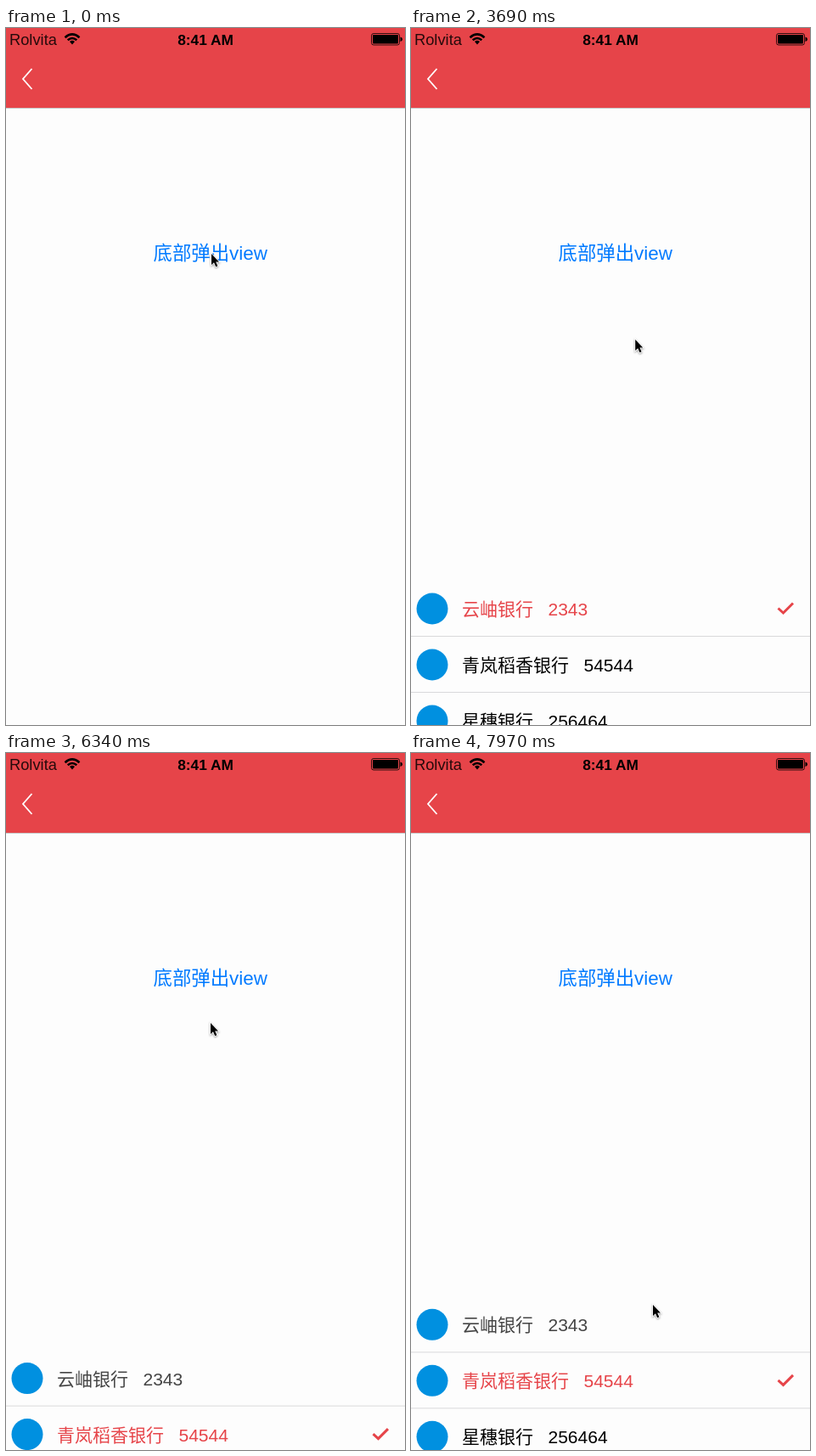
Animation, 470 px wide and 821 px high, one loop 8000 ms. Source, as an HTML page:

```html
<!DOCTYPE html>
<html lang="zh-CN">
<head>
<meta charset="utf-8">
<style>
html, body { margin: 0; height: 100%; overflow: hidden; background: #fdfdfd; }
svg { display: block; width: 100vw; height: 100vh; }
text { font-family: "Liberation Sans", "Noto Sans CJK SC", "Noto Sans CJK", sans-serif; white-space: pre; }
#button, .row text { font-weight: 300; }
.row text { font-size: 21px; }
#cursor { filter: drop-shadow(0 1px 1px #0006); }
</style>
</head>
<body>
<svg viewBox="0 0 470 821">
  <rect width="470" height="821" fill="#fdfdfd"/>
  <rect width="470" height="94" fill="#e64449"/>
  <rect y="94" width="470" height="0.7" fill="#b2b2b2"/>

  <text x="4" y="20" font-size="18.3" fill="#260a0b">Rolvita</text>
  <path d="M69.5 11.2Q78 3.6 86.5 11.2M72.7 14.3Q78 9.7 83.3 14.3" fill="none" stroke="#000" stroke-width="2.6"/>
  <path d="M75 16Q78 13.7 81 16L78 19.5Z"/>
  <text x="235" y="20" font-size="17.3" font-weight="700" text-anchor="middle">8:41 AM</text>
  <rect x="430.5" y="6.5" width="33" height="13.5" rx="2.5" fill="none" stroke="#000" stroke-width="0.8"/>
  <rect x="432" y="8" width="30" height="10.5" rx="1"/>
  <path d="M464.5 10.5Q467 11 467 13.2T464.5 16Z"/>
  <path d="M30.5 48L20 60L30.5 72" fill="none" stroke="#fff" stroke-width="1.8"/>

  <text id="button" x="173.5" y="273" font-size="22.4" fill="#007aff">底部弹出view</text>
  <g id="panel"></g>
  <path id="cursor" d="M1 1V14L4 11.2L6.2 16.2L8.4 15.200L6.200 10.400H10Z" stroke="#fff" stroke-width="1.6" paint-order="stroke"/>
</svg>
<script>
const STEP = 147.5, LOOP = 8000;
const RED = '#e64449', HEIGHT = 170, ROW = 66, PULL = 31;
const $ = id => document.getElementById(id);

// All times below are in steps; the picture only changes on whole steps.
const sessions = [
  { press: 4, open: 4.1, close: 15 },
  { press: 21, open: 22.3, close: 34 },
  { press: 41, open: 41.74, close: Infinity }
];
// Pointer moves: start, end, x, y.
const moves = [
  [8, 10, 204, 470], [10, 13, 287, 694],
  [17, 18, 241, 318], [18, 20, 241, 266],
  [23, 30, 353, 771], [30, 32, 336, 737],
  [34, 38, 243, 232], [38, 40, 241, 266],
  [42, 43, 240, 317], [43, 48, 290, 747], [48, 51, 284, 649]
];

const labels = ['云岫银行   2343', '青岚稻香银行   54544', '星穗银行   256464'];
$('panel').innerHTML = `<rect y="651" width="470" height="${HEIGHT + PULL}" fill="#fdfdfd"/>` + labels.map((label, i) => `
  <g class="row" transform="translate(0 ${684 + ROW * i})">
    <circle cx="25" r="18.5" fill="#0090e0"/>
    <text x="60" y="8">${label}</text>
    <path d="M432.5 -0.5L438.5 5L450 -6.5" fill="none" stroke="${RED}" stroke-width="3"/>
    ${i < 2 ? '<path d="M0 32.5H470" stroke="#d9d9db"/>' : ''}
  </g>`).join('');
const rows = [...document.querySelectorAll('.row')];

const clamp = u => Math.min(1, Math.max(0, u));
const smooth = u => (u = clamp(u), u * u * (3 - 2 * u));
const easeOut = u => 1 - (1 - clamp(u)) ** 4;

function pointerAt(step) {
  return moves.reduce(([x, y], [from, to, nx, ny]) => {
    const u = smooth((step - from) / (to - from));
    return [x + (nx - x) * u, y + (ny - y) * u];
  }, [241, 265]);
}

function panelY(step, { open, close }) {
  if (step >= close) return HEIGHT;
  const dragged = easeOut((step - 48) / 3) - smooth((step - 52) / 3.3);
  return HEIGHT * (1 - smooth((step - open) / 2)) - PULL * dragged;
}

function draw(now) {
  const step = Math.floor((now % LOOP + 6) / STEP);
  const index = Math.max(0, sessions.findLastIndex(s => step >= s.press));
  const session = sessions[index], selected = index - 1;
  const pressed = step >= session.press && step < session.open;

  $('panel').setAttribute('transform', `translate(0 ${panelY(step, session)})`);
  $('cursor').setAttribute('transform', `translate(${pointerAt(step)})`);
  $('button').setAttribute('opacity', pressed ? 0.25 : 1);
  rows.forEach((row, i) => {
    const [, text, check] = row.children;
    text.setAttribute('fill', i === selected ? RED : i < selected ? '#444' : '#000');
    check.setAttribute('visibility', i === selected ? 'visible' : 'hidden');
  });
}

const start = performance.now();
function tick() {
  draw(performance.now() - start);
  requestAnimationFrame(tick);
}
tick();
</script>
</body>
</html>
```
